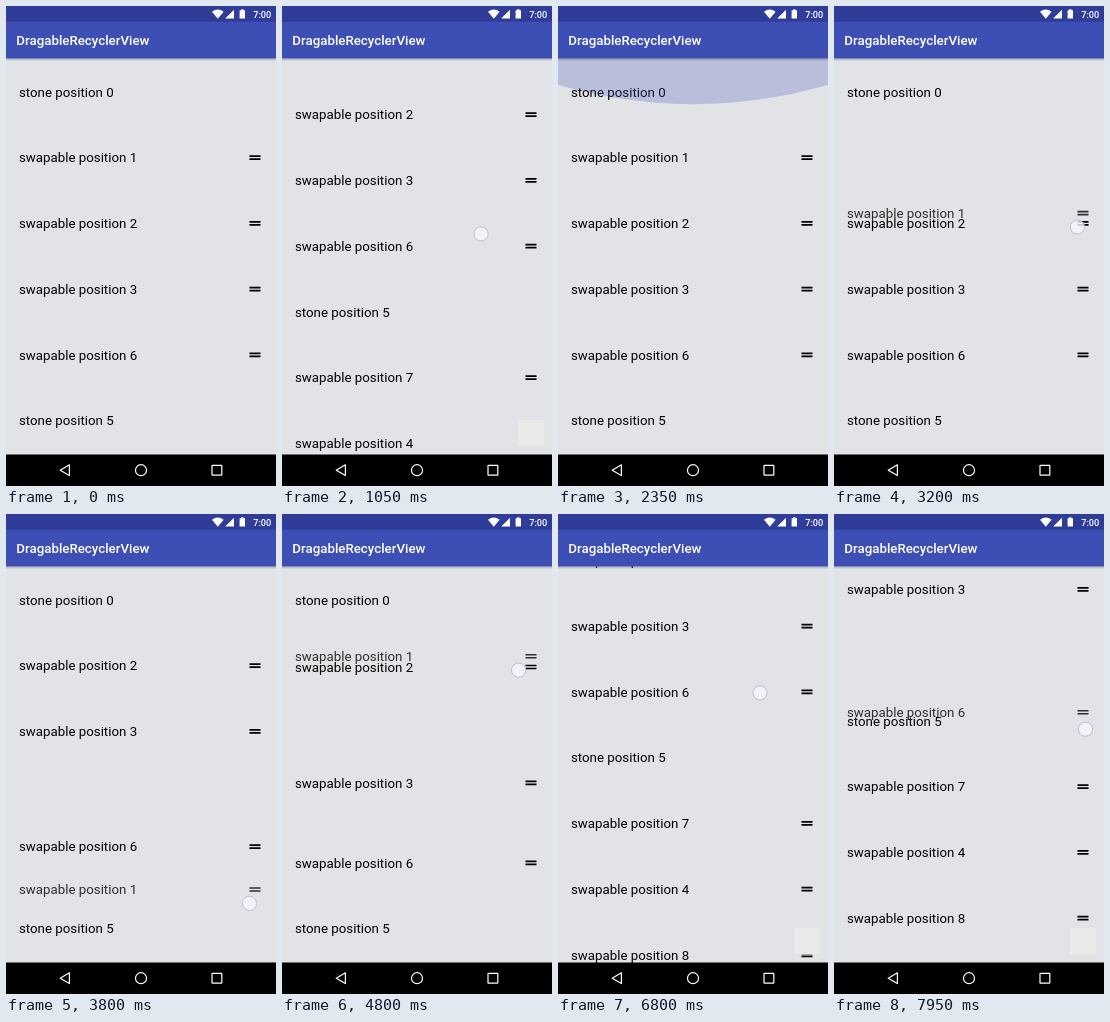
Recreate the animation shown at these times as an HTML page. Size 270 px wide and 480 px high, loop 8000 ms.

```html
<!DOCTYPE html>
<html lang="en">
<head>
<meta charset="utf-8">
<title>DragableRecyclerView</title>
<style>
  html, body { margin: 0; width: 100%; height: 100%; overflow: hidden; background: #e2e3e7; }
  svg { display: block; width: 100vw; height: 100vh; font-family: Roboto, "Noto Sans", sans-serif; }
  .row text { font-size: 13.3px; }
  .title { font-size: 13.3px; font-weight: 500; fill: #fff; }
  .clock { font-size: 9.2px; font-weight: 500; fill: #fff; }
</style>
</head>
<body>
<svg viewBox="0 0 270 480">
  <defs>
    <linearGradient id="shade" x1="0" y1="0" x2="0" y2="1">
      <stop offset="0" stop-color="#000" stop-opacity=".22"/>
      <stop offset="1" stop-color="#000" stop-opacity="0"/>
    </linearGradient>
  </defs>
  <rect width="270" height="480" fill="#e2e3e7"/>
  <g id="list"></g>
  <ellipse id="glow" cx="135" rx="405" fill="#3f51b5"/>
  <rect id="badge" x="236" y="414" width="26" height="26" fill="#eaebe9"/>

  <rect y="52.5" width="270" height="3" fill="url(#shade)"/>
  <rect width="270" height="52.5" fill="#3d4eb4"/>
  <rect width="270" height="15.75" fill="#2f3d99"/>
  <text class="title" x="10.3" y="39.2">DragableRecyclerView</text>
  <g fill="#fff">
    <path d="M206 5.8Q211.8 1.4 217.6 5.8L211.8 12.8Z"/>
    <path d="M219.2 12.5H228V3.7Z"/>
    <path d="M233.6 4.2H235.2V3.2H237.4V4.2H239V12.6H233.6Z"/>
  </g>
  <text class="clock" x="265.3" y="11.6" text-anchor="end">7:00</text>

  <rect y="448.5" width="270" height="31.5" fill="#000"/>
  <g fill="none" stroke="#fff" stroke-width="1.2">
    <path d="M63.4 458.8V469.6L54.2 464.2Z" stroke-linejoin="round"/>
    <circle cx="135" cy="464.2" r="5.5"/>
    <rect x="206" y="459.4" width="9.8" height="9.8" rx=".4"/>
  </g>
  <circle id="finger" r="7.1" fill="#f5f6fc" fill-opacity=".8" stroke="#b6b8de" stroke-width=".9"/>
</svg>
<script>
const LOOP = 8000, STEP = 50;
const ROW = 65.75, FIRST = 85.8;
const order = [0, 1, 2, 3, 6, 5, 7, 4, 8, 9, 10];
const stones = [0, 5, 10];
const swapped = [2, 3, 6];  // rows that make way for row 1

const part = (t, start, end) => Math.max(0, Math.min(1, (t - start) / (end - start)));
const smooth = p => (1 - Math.cos(Math.PI * p)) / 2;
const ramp = (t, start, end) => smooth(part(t, start, end));
// A swipe starts fast and slows down for long.
const swipe = (t, start, end) => smooth(Math.sqrt(part(t, start, end)));
const easeOut = p => 1 - (1 - p) ** 2;

const scrollAt = t =>
  183.7 * (swipe(t, 800, 1600) - ramp(t, 1600, 2100)) + 207.8 * swipe(t, 6415, 7150);

// Row 1 is dragged down, up past its place, then down one slot.
const firstDrag = t => FIRST + ROW
  + 231.5 * ramp(t, 2850, 3925) - 330 * ramp(t, 4050, 5200) + 174 * ramp(t, 5200, 5850);
const lastDrag = t => slotY(4, t) + 72 * ramp(t, 7600, 8100);

const slotY = (slot, t) => FIRST + ROW * slot - scrollAt(t);

function slotOf(id, t) {
  const slot = order.indexOf(id), i = swapped.indexOf(id);
  if (i < 0) return slot;
  const shift = start => ramp(t, start, start + 250);
  return slot - shift(3235 + 241 * i) + shift(4777 - 150 * i) - (id === 2 ? shift(5800) : 0);
}

function rowState(id, t) {
  if (id === 1 && t >= 2850) {
    const drop = ramp(t, 6000, 6250), held = firstDrag(t);
    return t < 6000 ? [held, 0.8]
      : [slotY(2, t) + (held - slotY(2, 6000)) * (1 - drop), 0.8 + 0.2 * drop];
  }
  if (id === 6 && t >= 7500) return [lastDrag(t), 0.8];
  return [slotY(slotOf(id, t), t), 1];
}

// The touch runs a little ahead of what it moves.
function fingerAt(t) {
  if (t >= 800 && t < 1950)
    return [200 - 3 * part(t, 800, 1600), 336.7 - scrollAt(t)];
  if (t >= 2850 && t < 6000)
    return [243.5 - 18.5 * ramp(t, 4050, 5850), firstDrag(t) + 14 * ramp(t, 2850, 3100)];
  if (t >= 6400 && t < 7250)
    return [202 + 1.5 * part(t, 6800, 7150), 364.3 - scrollAt(t + 70)];
  if (t >= 7500)
    return [255 - 3.5 * ramp(t, 7600, 7950), lastDrag(t) + 1 + 16 * ramp(t, 7600, 7850)];
  return null;
}

const $ = id => document.getElementById(id);
const list = $("list"), glow = $("glow"), badge = $("badge"), finger = $("finger");

function makeRow(id) {
  const g = document.createElementNS("http://www.w3.org/2000/svg", "g");
  const stone = stones.includes(id);
  g.setAttribute("class", "row");
  g.innerHTML = `<text x="12.9" y="4.9">${stone ? "stone" : "swapable"} position ${id}</text>`
    + (stone ? "" : '<path d="M243.5 -2.2h11v1.6h-11zM243.5 .8h11v1.6h-11z"/>');
  return g;
}

const rows = {};
for (const id of order) rows[id] = makeRow(id);
// The two dragged rows stay above the others.
for (const id of [...order.filter(id => id !== 1 && id !== 6), 6, 1]) list.append(rows[id]);

function draw(t) {
  for (const id of order) {
    const [y, alpha] = rowState(id, t);
    rows[id].setAttribute("transform", `translate(0 ${y.toFixed(2)})`);
    rows[id].setAttribute("opacity", alpha);
  }

  const size = easeOut(part(t, 2100, 2300)) - easeOut(part(t, 2300, 2900));
  glow.setAttribute("ry", 405 * size);
  glow.setAttribute("cy", 52.5 + (54.3 - 405) * size);
  glow.setAttribute("opacity", 0.3 * size);

  badge.setAttribute("visibility", scrollAt(t) > 90 ? "visible" : "hidden");

  const spot = fingerAt(t);
  finger.setAttribute("visibility", spot ? "visible" : "hidden");
  if (spot) {
    finger.setAttribute("cx", spot[0]);
    finger.setAttribute("cy", spot[1]);
  }
}

const begin = performance.now();
function tick() {
  const t = (performance.now() - begin) % LOOP;
  draw(Math.floor(t / STEP) * STEP);
  requestAnimationFrame(tick);
}
draw(0);
requestAnimationFrame(tick);
</script>
</body>
</html>
```
